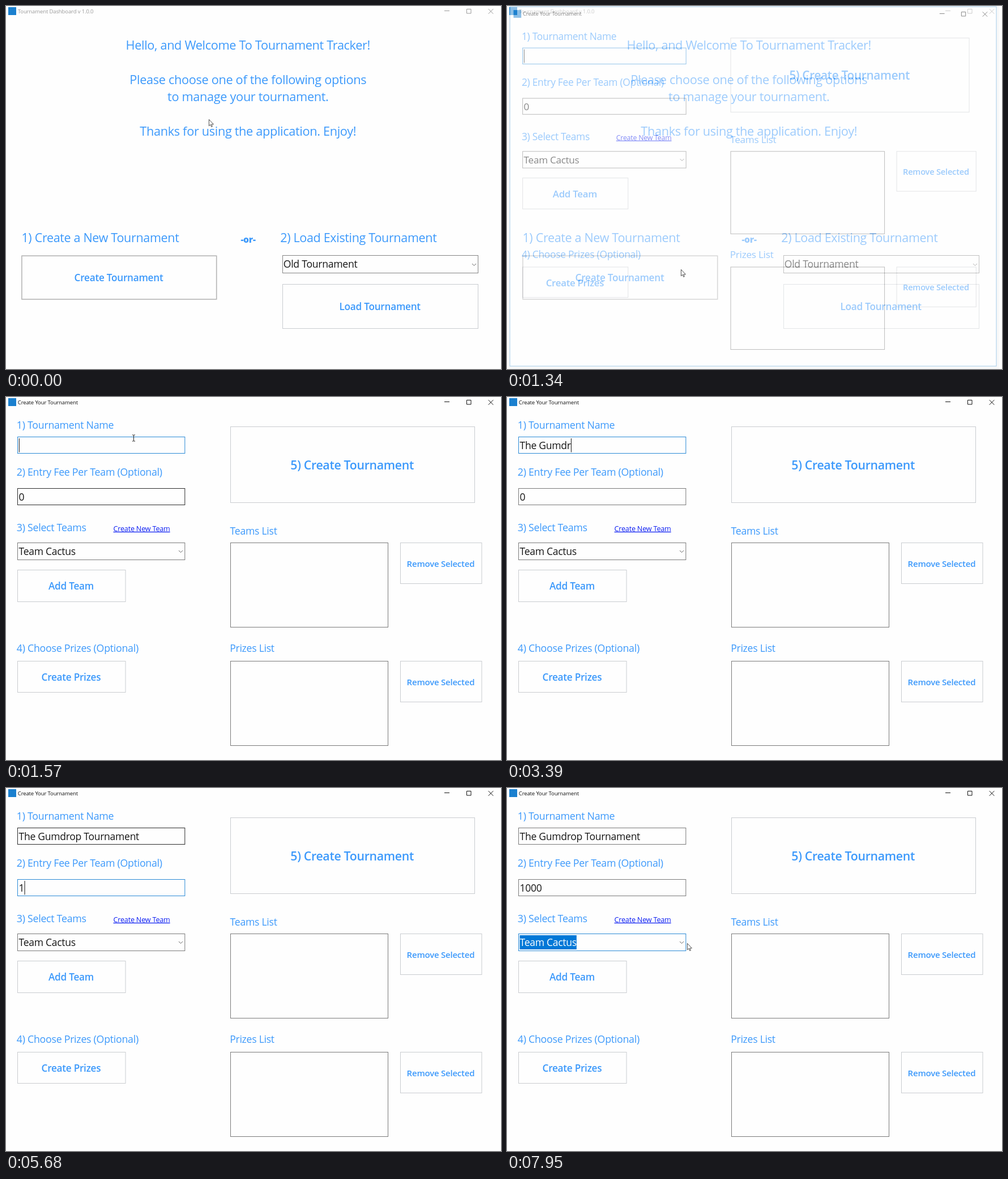
These frames come from a looping animation (874x641 px, 8 s). An HTML page:

```html
<!DOCTYPE html>
<html lang="en">
<head>
<meta charset="utf-8">
<title>Tournament screens</title>
<style>
  html, body { margin: 0; width: 100%; height: 100%; overflow: hidden; background: #fefefe; }
  svg { display: block; width: 100vw; height: 100vh; }
  text { font-family: "Open Sans", "Noto Sans", sans-serif; letter-spacing: -.015em; white-space: pre; }
</style>
</head>
<body>
<svg id="stage" viewBox="0 0 874 641" xmlns="http://www.w3.org/2000/svg"></svg>
<script>
const LOOP = 8000, TICK = 78.8, FIRST_TICK = 70;
const BLUE = "#3c99fb", FOCUS = "#2b8ad6", GREY = "#7a7a7a", DARK = "#2c2c2c", INK = "#151515";
const NAME = "The Gumdrop Tournament", FEE = "1000", TEAM = "Team Cactus";
const NAME_KEYS = [2350, 2590, 2670, 2750, 2990, 3150, 3230, 3310, 3390, 3550, 3630,
  3790, 3870, 4030, 4180, 4260, 4340, 4490, 4570, 4650, 4730, 4810];
const FEE_KEYS = [5680, 5760, 5910, 6300];

// [time, x, y]
const TO_BUTTON = [[0, 358, 200], [70, 361, 203], [230, 378, 238], [390, 376, 288], [550, 358, 345],
  [700, 335, 392], [860, 319, 419], [940, 312, 450], [1015, 307, 465]];
const TO_FIELD = [[1331, 307, 465], [1409, 290, 380], [1488, 246, 176], [1567, 225, 72]];
const TO_COMBO = [[7477, 443, 161], [7635, 420, 205], [7790, 365, 252], [7950, 318, 274]];

const stage = document.getElementById("stage");

function el(parent, tag, attrs, content) {
  const node = document.createElementNS("http://www.w3.org/2000/svg", tag);
  set(node, attrs);
  if (content !== undefined) node.textContent = content;
  return parent.appendChild(node);
}
function set(node, attrs) {
  for (const key in attrs) node.setAttribute(key, attrs[key]);
}
function show(node, on) {
  node.setAttribute("visibility", on ? "visible" : "hidden");
}
function text(parent, x, y, size, str, attrs) {
  return el(parent, "text", { x, y, "font-size": size, fill: BLUE, ...attrs }, str);
}
function middle(parent, x, y, size, str, weight = 400) {
  return text(parent, x, y, size, str, { "text-anchor": "middle", "font-weight": weight });
}
function box(parent, x1, y1, x2, y2, stroke, width = 1) {
  return el(parent, "rect", { x: x1, y: y1, width: x2 - x1, height: y2 - y1,
    fill: "#fefefe", stroke, "stroke-width": width });
}
function button(parent, x1, y1, x2, y2, size, str, width) {
  const face = box(parent, x1, y1, x2, y2, width ? "#b5b5b5" : "#c9ccd0", width);
  middle(parent, (x1 + x2) / 2 - .8, (y1 + y2) / 2 + size * .4, size, str, 600);
  return face;
}
function chevron(parent, x, y) {
  el(parent, "path", { d: `M${x - 3.5} ${y - 2}l3.5 3.5l3.5 -3.5`, fill: "none", stroke: "#666" });
}
function titleBar(parent, str, color) {
  el(parent, "rect", { x: 4, y: 2, width: 14, height: 14, fill: "#1b80cf" });
  const label = text(parent, 20.8, 12.6, 9.55, str, { fill: color });
  const icons = el(parent, "path", { d: "M774 8.5h9M813.5 5.5h7.5v7.5h-7.5zM851.7 5.2l8.6 8.6M860.3 5.2l-8.6 8.6",
    fill: "none", stroke: color });
  return c => { set(label, { fill: c }); set(icons, { stroke: c }); };
}

// Dashboard window
const dash = el(stage, "g", {});
el(dash, "rect", { width: 874, height: 641, fill: "#fefefe" });
const tintTitle = titleBar(dash, "Tournament Dashboard v 1.0.0", "#999");
[["Hello, and Welcome To Tournament Tracker!", 76.5],
 ["Please choose one of the following options", 137.5],
 ["to manage your tournament.", 168],
 ["Thanks for using the application. Enjoy!", 229.3]].forEach(([s, y]) => middle(dash, 427.3, y, 21.7, s));
text(dash, 27.4, 417, 21.5, "1) Create a New Tournament");
middle(dash, 427.5, 418, 15.6, "-or-", 800);
text(dash, 484.2, 417, 21.5, "2) Load Existing Tournament");
const createFace = button(dash, 27.9, 441.2, 371.7, 517.8, 17.2, "Create Tournament", 1.6);
box(dash, 488.5, 440.5, 833.5, 471.5, "#858585");
text(dash, 489.7, 462.4, 17.6, "Old Tournament", { fill: INK });
chevron(dash, 826.5, 457);
button(dash, 488.5, 491.5, 833.5, 569.5, 17.2, "Load Tournament");

// Creation window
const form = el(stage, "g", {});
el(form, "rect", { x: -2, y: -3, width: 880, height: 651, fill: "none", stroke: "#000",
  "stroke-opacity": .05, "stroke-width": 8 });
el(form, "rect", { x: -2.6, y: -4, width: 879.2, height: 649.6, fill: "#fefefe", stroke: "#4a9ad4" });
titleBar(form, "Create Your Tournament", "#111");
text(form, 18.8, 56, 17.75, "1) Tournament Name");
text(form, 18.8, 138.6, 17.75, "2) Entry Fee Per Team (Optional)");
text(form, 18.8, 237, 17.75, "3) Select Teams");
text(form, 18.8, 450.4, 17.75, "4) Choose Prizes (Optional)");
text(form, 395.6, 242.8, 17.6, "Teams List");
text(form, 395.2, 450.4, 17.6, "Prizes List");
text(form, 189.5, 236.8, 12.6, "Create New Team", { fill: "#0c1ef2", "text-decoration": "underline" });
button(form, 396.5, 52.5, 827.5, 186.5, 21.3, "5) Create Tournament");
button(form, 20.5, 305.5, 211, 361.5, 17.2, "Add Team");
button(form, 20.5, 466.5, 211, 521.5, 17.2, "Create Prizes");
button(form, 696.5, 257.5, 840, 329.5, 15, "Remove Selected");
button(form, 696.5, 466.5, 840, 538.5, 15, "Remove Selected");
box(form, 396.5, 257.5, 674.5, 406.5, GREY);
box(form, 396.5, 466.5, 674.5, 615.5, GREY);

// An editable field: border, selection, text and caret
function field(y1, y2, str) {
  const border = box(form, 20.5, y1, 315.8, y2, GREY);
  const mark = el(form, "rect", { x: 22.5, y: y1 + 2.5, height: 25, fill: "#0078d7" });
  const label = text(form, 22.5, y1 + 21.8, 17.5, str, { fill: INK });
  const caret = el(form, "rect", { y: y1 + 2.5, width: 1, height: 24.5, fill: "#111" });
  return (value, color, caretOn, selected) => {
    label.textContent = value;
    const w = value ? label.getComputedTextLength() : 0;
    set(border, { stroke: color });
    set(label, { fill: selected ? "#fff" : INK });
    set(mark, { width: selected ? w : 0 });
    set(caret, { x: 22.8 + w, width: caretOn ? 1 : 0 });
  };
}
const nameField = field(70.5, 99.5, "");
const feeField = field(161.5, 190.5, "0");
const teamField = field(257.5, 287.5, TEAM);
chevron(form, 308.5, 273);

// Pointer
const halo = el(stage, "circle", { cx: 307, cy: 464.2, r: 10, fill: "#b3b12f" });
const arrow = el(stage, "path", { d: "M0 0V11.4L2.6 9L4.3 13L6 12.3L4.3 8.5H8Z", fill: "#fff", stroke: "#222", "stroke-width": .8 });
const beam = el(stage, "path", { d: "M-2.5 -5.5h2l.5 .5l.5 -.5h2M0 -5V5M-2.5 5.5h2l.5 -.5l.5 .5h2", fill: "none", stroke: "#222" });

const clamp = v => Math.min(1, Math.max(0, v));
const ramp = (t, a, b) => clamp((t - a) / (b - a));
const typed = (str, keys, t) => str.slice(0, keys.filter(k => k <= t).length);

function mix(a, b, p) {
  const part = (c, i) => parseInt(c.slice(i, i + 2), 16);
  return `rgb(${[1, 3, 5].map(i => Math.round(part(a, i) + (part(b, i) - part(a, i)) * p))})`;
}
function along(path, t) {
  let i = 1;
  while (i < path.length - 1 && path[i][0] < t) i++;
  const [t0, x0, y0] = path[i - 1], [t1, x1, y1] = path[i];
  const p = ramp(t, t0, t1);
  return [x0 + (x1 - x0) * p, y0 + (y1 - y0) * p];
}

function drawDash(t, q) {
  show(dash, t < 1570);
  const pressed = t >= 1015 && t < 1250;
  tintTitle(pressed ? "#111111" : "#999999");
  show(halo, pressed);
  set(createFace, { fill: t < 1250 ? mix("#fefefe", "#646564", ramp(q, 860, 1090)) : "#fefefe" });
}

function drawForm(t) {
  const alpha = t < 1250 ? 0 : t < 1330 ? .14 : t < 1408 ? .5 : t < 1487 ? .84 : t < 1566 ? .97 : 1;
  const rest = 1 - alpha;
  show(form, alpha > 0);
  set(form, { opacity: alpha,
    transform: `translate(${15.2 * rest} ${10.4 * rest}) scale(${1 - .046 * rest})` });

  const nameColor = t < 5280 ? FOCUS
    : t < 5680 ? mix(FOCUS, DARK, ramp(t, 5200, 5520))
    : mix(DARK, GREY, ramp(t, 5760, 6300));
  nameField(typed(NAME, NAME_KEYS, t), nameColor, t < 2040 || (t >= 2350 && t < 5280), false);

  const hovered = t >= 1487 && t < 1880;
  const feeColor = hovered ? DARK
    : t < 6840 ? mix(GREY, FOCUS, ramp(t, 5200, 5520))
    : mix(FOCUS, GREY, ramp(t, 6760, 7160));
  feeField(typed(FEE, FEE_KEYS, t) || "0", feeColor, t >= 5680 && t < 6840, t >= 5360 && t < 5680);

  const teamOn = t >= 6920;
  teamField(TEAM, mix(GREY, FOCUS, ramp(t, 6840, 7160)), teamOn && t < 7480, teamOn);
}

function drawPointer(t, q) {
  const path = t < 1250 ? TO_BUTTON : t < 2350 ? TO_FIELD : TO_COMBO;
  const [x, y] = along(path, q);
  const inField = t >= 1487 && t < 2350;
  set(arrow, { transform: `translate(${x + .4} ${y + .4})` });
  set(beam, { transform: `translate(${x + .5} ${y + .5})` });
  show(beam, inField);
  show(arrow, t < 1487 || t >= 7477);
}

function draw(t) {
  const q = t < FIRST_TICK ? 0 : FIRST_TICK + Math.floor((t - FIRST_TICK) / TICK + 1e-6) * TICK;
  drawDash(t, q);
  drawForm(t);
  drawPointer(t, q);
}

const start = performance.now();
function tick() {
  draw((performance.now() - start) % LOOP);
  requestAnimationFrame(tick);
}
tick();
</script>
</body>
</html>
```
